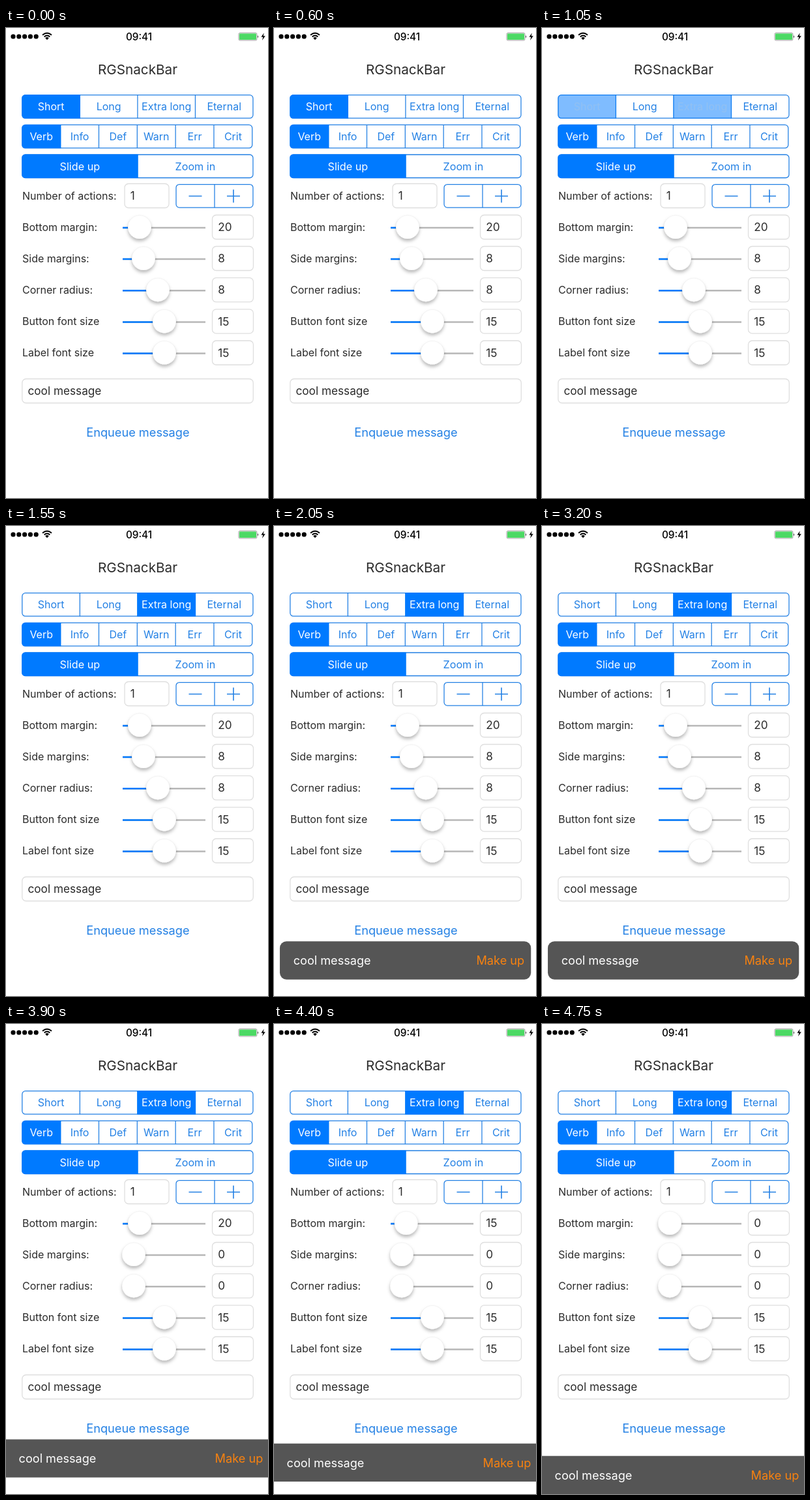
These frames come from a looping animation (402x720 px, 5050 ms). An HTML page:

```html
<!DOCTYPE html>
<html lang="en">
<head>
<meta charset="utf-8">
<title>RGSnackBar</title>
<style>
  html, body { margin: 0; width: 100%; height: 100%; overflow: hidden; background: #fff; }
  svg { display: block; width: 402px; height: 720px; font-family: Inter, Roboto, sans-serif; }
</style>
</head>
<body>
<svg id="stage" viewBox="0 0 402 720">
  <defs>
    <filter id="shadow" x="-40%" y="-40%" width="180%" height="190%">
      <feDropShadow dx="0" dy="3.5" stdDeviation="2.6" flood-color="#000" flood-opacity=".27"/>
    </filter>
  </defs>
</svg>
<script>
const LOOP = 5050, STEP = 50, PT = 1.2676;
const BLUE = '#007aff', LINE = '#2380e4', INK = '#2b2b2b';
const stage = document.getElementById('stage');

function add(tag, attrs, parent = stage) {
  const el = document.createElementNS('http://www.w3.org/2000/svg', tag);
  set(el, attrs);
  return parent.appendChild(el);
}
function set(el, attrs) {
  for (const k in attrs) el.setAttribute(k, attrs[k]);
}
// y is the middle of the capital letters
function text(str, x, y, size, fill = INK, anchor = 'start', parent = stage, weight = 400) {
  const el = add('text', { x, y: y + size * 0.364, 'font-size': size, fill,
    'text-anchor': anchor, 'font-weight': weight }, parent);
  el.textContent = str;
  return el;
}
function box(x, y, width, height, rx, fill, stroke = 'none', parent = stage) {
  return add('rect', { x, y, width, height, rx, fill, stroke, 'stroke-width': PT }, parent);
}
function path(d, stroke, width, fill = 'none') {
  return add('path', { d, stroke, fill, 'stroke-width': width });
}

// Segmented control; returns the highlight layer of each segment
function segments(labels, y, right, size = 16) {
  const left = 24.8, w = (right - left) / labels.length, h = 35.5, id = 'clip' + y;
  const edge = PT / 2;
  box(left, y, right - left, h, 5, 'none', LINE);
  box(left - edge, y - edge, right - left + PT, h + PT, 5.5, BLUE, 'none',
    add('clipPath', { id }));
  labels.forEach((label, i) => {
    const x = left + w * i;
    if (i) path(`M${x} ${y}v${h}`, LINE, PT);
    text(label, x + w / 2, y + h / 2, size, LINE, 'middle');
  });
  const highlights = add('g', { 'clip-path': `url(#${id})` });
  return labels.map((label, i) => {
    const x = left + w * i;
    const on = add('g', { opacity: 0 }, highlights);
    box(x - edge, y - edge, w + PT, h + PT, 0, BLUE, 'none', on);
    text(label, x + w / 2, y + h / 2, size, '#fff', 'middle', on);
    return on;
  });
}

function field(value, x, y, w) {
  box(x, y - 18.5, w, 37, 6, '#fff', '#dedede');
  return text(value, x + 8.7, y, 17.2);
}

// Slider row; thumb centre is 196 + value * gain
function slider(label, y, gain, value) {
  text(label, 25, y, 16);
  path(`M179 ${y + 1}H306`, '#b7b7b7', 2.5);
  const fill = path('', BLUE, 2.5);
  const thumb = add('circle', { cy: y, r: 18, fill: '#fff', stroke: '#00000014',
    'stroke-width': 0.6, filter: 'url(#shadow)' });
  const num = field('', 316.5, y, 63);
  const update = v => {
    const x = 196 + v * gain;
    set(fill, { d: `M179 ${y + 1}H${x}` });
    set(thumb, { cx: x });
    num.textContent = Math.round(v);
  };
  update(value);
  return update;
}

function statusBar() {
  for (let i = 0; i < 5; i++) add('circle', { cx: 11 + 8.8 * i, cy: 13, r: 3.6, fill: '#000' });
  path('M56 10.8Q63 4.8 70 10.8M58.6 13.5Q63 9.7 67.4 13.5', '#000', 1.9);
  path('M60.2 15.2Q63 12.8 65.8 15.2L63 18.2Z', 'none', 0, '#000');
  text('09:41', 204, 13, 15.3, '#000', 'middle', stage, 500);
  set(box(357, 7.5, 28, 11.5, 2, '#fff', '#8a8a8a'), { 'stroke-width': 0.8 });
  box(358, 8.5, 26, 9.5, 1, '#4cd964');
  path('M386.2 11.2q2 2 0 4z', 'none', 0, '#222');
  path('M395.8 7.5L391.5 13.8H394.4L393 19L397.8 12.2H394.8Z', 'none', 0, '#000');
}

statusBar();
text('RGSnackBar', 202, 63.5, 20.7, INK, 'middle');
const spans = segments(['Short', 'Long', 'Extra long', 'Eternal'], 102.7, 379);
const levels = segments(['Verb', 'Info', 'Def', 'Warn', 'Err', 'Crit'], 148.4, 377.8);
const styles = segments(['Slide up', 'Zoom in'], 194, 379, 16.2);
set(levels[0], { opacity: 1 });
set(styles[0], { opacity: 1 });

text('Number of actions:', 25, 257.5, 16);
field('1', 182, 257, 68);
box(261, 239.6, 118, 35.5, 5, 'none', LINE);
path('M320 239.6v35.5', LINE, PT);
path('M280.5 257.5h20M339 257.5h20M349 247.5v20', LINE, 1.6);

const setBottom = slider('Bottom margin:', 305, 9 / 20, 20);
const setSide = slider('Side margins:', 353, 15 / 8, 8);
const setCorner = slider('Corner radius:', 401.2, 37 / 8, 8);
slider('Button font size', 449.4, 47 / 15, 15);
slider('Label font size', 497.5, 47 / 15, 15);
field('cool message', 24.8, 556, 354.5);
const enqueue = text('Enqueue message', 202.4, 619.5, 18.2, LINE, 'middle');

const bar = add('g', {});
const plate = box(0, 0, 0, 58.3, 0, '#555', 'none', bar);
const message = text('cool message', 0, 29.3, 18.1, '#fff', 'start', bar);
const action = text('Make up', 0, 29.3, 18.2, '#f9820f', 'end', bar);

const ramp = (t, a, b) => Math.min(1, Math.max(0, (t - a) / (b - a)));

function draw(t) {
  const pick = ramp(t, 975, 1125);
  set(spans[0], { opacity: 1 - pick });
  set(spans[2], { opacity: pick });
  set(enqueue, { opacity: t >= 1700 && t < 1800 ? 0.3 : 1 });

  const corner = 8 * (1 - ramp(t, 3400, 3600));
  const side = t < 3900 ? 8 : 0;
  const bottom = 20 * (1 - ramp(t, 4350, 4550));
  setCorner(corner);
  setSide(side);
  setBottom(bottom);

  const hidden = (1 - ramp(t, 1850, 2050)) ** 2;
  const left = side * PT - 1.2, right = 404.4 - side * PT;
  const top = 661.7 - bottom * PT + hidden * 84;
  set(bar, { transform: `translate(0 ${top})`, visibility: hidden < 1 ? 'visible' : 'hidden' });
  set(plate, { x: left, width: right - left, rx: corner * PT });
  set(message, { x: left + 20.8 });
  set(action, { x: right - 10 });
}

const start = performance.now();
function tick() {
  const t = (performance.now() - start) % LOOP;
  draw(Math.floor(t / STEP) * STEP);
  requestAnimationFrame(tick);
}
tick();
</script>
</body>
</html>
```
